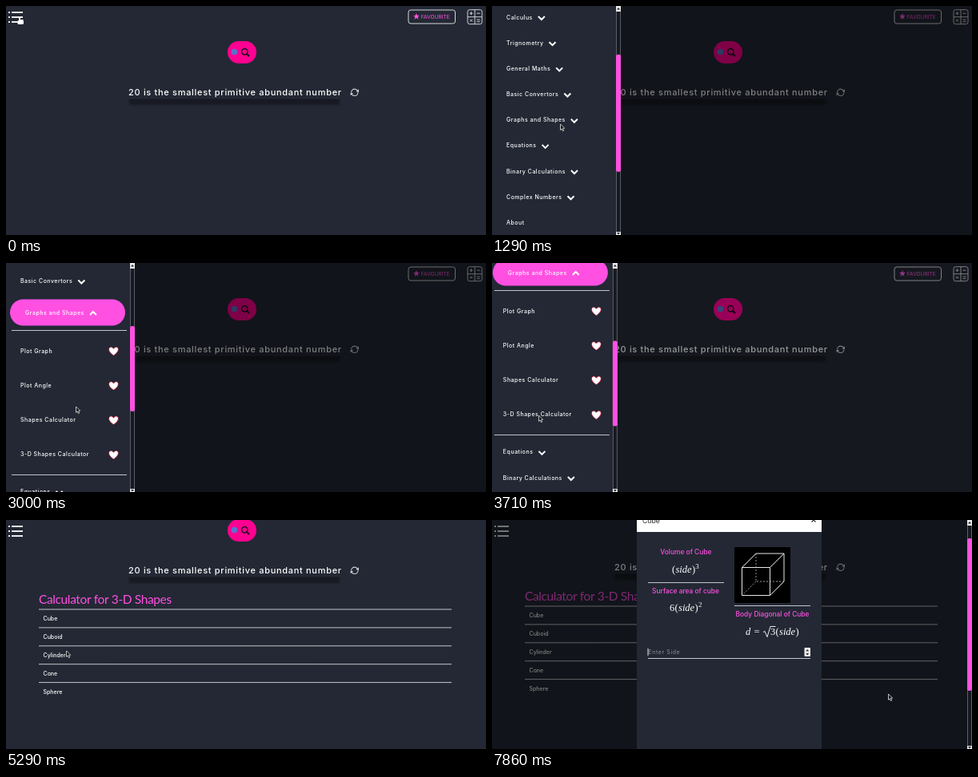
An HTML page with a canvas for the animation above (8 s loop, 600 by 287 pixels).

```html
<!DOCTYPE html>
<html lang="en">
<head>
<meta charset="utf-8">
<title>Calculator for 3-D Shapes</title>
<style>
html, body { margin: 0; width: 100%; height: 100%; overflow: hidden; background: #232834; }
canvas { display: block; width: 600px; height: 287px; }
</style>
</head>
<body>
<canvas id="stage"></canvas>
<script>
const W = 600, H = 287, LOOP = 8000, STEP = 1000 / 7;
const BG = '#232834', PINK = '#ff50e2', HOT = '#ff0090', WHITE = '#fff', RULE = '#c4c6ca';
const SANS = 'Inter, sans-serif', SERIF = '"Liberation Serif", serif';
const SIDE = 161;
const canvas = document.getElementById('stage');
const ctx = canvas.getContext('2d');
const ratio = window.devicePixelRatio || 1;
canvas.width = W * ratio;
canvas.height = H * ratio;

const clamp = x => Math.max(0, Math.min(1, x));
const smooth = x => x * x * (3 - 2 * x);
const inOut = x => x < .5 ? 4 * x ** 3 : 1 - (2 - 2 * x) ** 3 / 2;
const ramp = (t, a, b, ease = smooth) => ease(clamp((t - a) / (b - a)));

// Eased value between [time, value] keys
function track(t, keys) {
  let v = keys[0][1];
  for (let i = 1; i < keys.length; i++) {
    v += (keys[i][1] - keys[i - 1][1]) * ramp(t, keys[i - 1][0], keys[i][0]);
  }
  return v;
}

function text(s, x, y, size, { color = WHITE, weight = 400, gap = 0, font = SANS, align = 'left', style = '' } = {}) {
  ctx.font = `${style} ${weight} ${size}px ${font}`;
  ctx.letterSpacing = gap + 'px';
  ctx.textAlign = align;
  ctx.textBaseline = 'alphabetic';
  ctx.fillStyle = color;
  ctx.fillText(s, x, y);
  return ctx.measureText(s).width;
}

function line(points, color = WHITE, width = 1, dash = []) {
  ctx.beginPath();
  points.forEach(([x, y], i) => i ? ctx.lineTo(x, y) : ctx.moveTo(x, y));
  ctx.strokeStyle = color;
  ctx.lineWidth = width;
  ctx.setLineDash(dash);
  ctx.stroke();
  ctx.setLineDash([]);
}

const rule = (x1, x2, y) => line([[x1, y], [x2, y]], RULE);

function rect(x, y, w, h, color) {
  ctx.fillStyle = color;
  ctx.fillRect(x, y, w, h);
}

function round(x, y, w, h, r, color, stroked) {
  ctx.beginPath();
  ctx.roundRect(x, y, w, h, r);
  if (stroked) {
    ctx.strokeStyle = color;
    ctx.lineWidth = 1;
    ctx.stroke();
  } else {
    ctx.fillStyle = color;
    ctx.fill();
  }
}

function poly(points, color) {
  ctx.beginPath();
  points.forEach(([x, y]) => ctx.lineTo(x, y));
  ctx.closePath();
  ctx.fillStyle = color;
  ctx.fill();
}

function at(x, y, draw) {
  ctx.save();
  ctx.translate(x, y);
  draw();
  ctx.restore();
}

const shade = alpha => rect(0, 0, W, H, `rgba(0,0,0,${alpha})`);

function hamburger() {
  for (const y of [8, 14, 20]) {
    rect(3, y - .9, 2, 1.8, WHITE);
    rect(7, y - .9, 14, 1.8, WHITE);
  }
}

function star(x, y, r) {
  const points = [];
  for (let i = 0; i < 10; i++) {
    const a = i * Math.PI / 5 - Math.PI / 2, d = i % 2 ? r * .42 : r;
    points.push([x + d * Math.cos(a), y + d * Math.sin(a)]);
  }
  poly(points, PINK);
}

function toolbar() {
  round(503, 5, 58.5, 17, 3, '#d6d7da', true);
  star(513, 13.3, 4.2);
  text('FAVOURITE', 518.8, 16.2, 6.6, { color: PINK });
  const c = '#d0d1d4';
  at(577, 4.7, () => {
    round(0, 0, 18, 18, 2.5, c, true);
    line([[9, 0], [9, 18]], c);
    line([[0, 9], [18, 9]], c);
    line([[2.5, 4.5], [6.5, 4.5]], c);
    line([[4.5, 2.5], [4.5, 6.5]], c);
    line([[11.5, 4.5], [15.5, 4.5]], c);
    line([[3, 12], [6, 15]], c);
    line([[6, 12], [3, 15]], c);
    line([[11.5, 12.5], [15.5, 12.5]], c);
    line([[11.5, 15], [15.5, 15]], c);
  });
}

function searchPill() {
  round(277, 44, 36, 28, 14, HOT);
  ctx.beginPath();
  ctx.arc(285.5, 57.5, 3.8, 0, 7);
  ctx.fillStyle = '#5874cc';
  ctx.fill();
  ctx.beginPath();
  ctx.arc(298.3, 57.3, 3.7, 0, 7);
  ctx.strokeStyle = '#16101a';
  ctx.lineWidth = 1.5;
  ctx.stroke();
  line([[301, 60], [304, 63]], '#16101a', 2.1);
}

function refresh(x, y) {
  const c = '#d4d5d9';
  for (const turn of [0, Math.PI]) {
    at(x, y, () => {
      ctx.rotate(turn);
      ctx.beginPath();
      ctx.arc(0, 0, 4.2, Math.PI, Math.PI * 1.85);
      ctx.strokeStyle = c;
      ctx.lineWidth = 1.1;
      ctx.stroke();
      poly([[5.2, -4], [5.2, -.3], [1.8, -1]], c);
    });
  }
}

function fact() {
  ctx.save();
  ctx.beginPath();
  ctx.rect(140, 116.5, 290, 20);
  ctx.clip();
  ctx.filter = 'blur(1.8px)';
  rect(154, 108, 263, 16, '#171a22');
  ctx.restore();
  text('20 is the smallest primitive abundant number', 153, 112, 11, { weight: 500, gap: .69 });
  refresh(435.8, 108.3);
}

const SHAPES = ['Cube', 'Cuboid', 'Cylinder', 'Cone', 'Sphere'];

function shapeList(t) {
  if (t < 3800) return;
  text('Calculator for 3-D Shapes', 41, 150.2, 15.5, { color: PINK, gap: -.38, font: 'Lato, sans-serif' });
  ctx.save();
  ctx.beginPath();
  ctx.rect(0, 150, W, track(t, [[4000, 8], [4140, 29], [4430, 130]]));
  ctx.clip();
  SHAPES.forEach((name, i) => {
    const y = 157 + i * 22.9;
    rule(41, 557, y);
    text(name, 46.5, y + 14, 7, { weight: 500 });
  });
  ctx.restore();
}

function page(t) {
  rect(0, 0, W, H, BG);
  const scroll = track(t, [[4710, 0], [5290, 45], [5710, 49]]);
  at(0, -scroll, () => {
    toolbar();
    searchPill();
    fact();
    shapeList(t);
  });
  hamburger();
}

function scrollbar(x, top, size) {
  rect(x, 0, 6, H, '#5b5e66');
  rect(x + 1, 0, 4, H, '#16191f');
  rect(x, 0, 6, 7, '#e8e8ea');
  rect(x, 283, 6, 4, '#e8e8ea');
  poly([[x + 1, 4.5], [x + 3, 2], [x + 5, 4.5]], '#222');
  poly([[x + 1, 284], [x + 5, 284], [x + 3, 286.5]], '#222');
  round(x, top, 6, size, 2.5, PINK);
}

function chevron(x, y, up) {
  const d = up ? -2 : 2;
  line([[x - 4, y - d], [x, y + d], [x + 4, y - d]], WHITE, 2);
}

function heart(x, y) {
  ctx.beginPath();
  ctx.moveTo(x, y + 5);
  ctx.bezierCurveTo(x - 10, y - 2, x - 4, y - 8, x, y - 2.6);
  ctx.bezierCurveTo(x + 4, y - 8, x + 10, y - 2, x, y + 5);
  ctx.fillStyle = WHITE;
  ctx.strokeStyle = '#e0304c';
  ctx.lineWidth = 1.2;
  ctx.stroke();
  ctx.fill();
}

const MENU = ['Home', 'Algebra', 'Calculus', 'Trignometry', 'General Maths', 'Basic Convertors',
  'Graphs and Shapes', 'Equations', 'Binary Calculations', 'Complex Numbers', 'About'];
const GRAPHS = ['Plot Graph', 'Plot Angle', 'Shapes Calculator', '3-D Shapes Calculator'];
const LABEL = { weight: 500, gap: .5 };

function menuRow(name, x, y, open) {
  const w = text(name, x, y + 2.5, 7, LABEL);
  if (name !== 'Home' && name !== 'About') chevron(x + w + 11, y + 1, open);
}

function submenu(y, open) {
  ctx.save();
  ctx.beginPath();
  ctx.rect(0, y + 17, 155, 12 + 181 * open);
  ctx.clip();
  for (const d of [22.5, 203.5]) rule(7, 151, y + d);
  GRAPHS.forEach((name, i) => {
    const row = y + 48 + i * 43.3;
    text(name, 18, row + 2.5, 7, LABEL);
    heart(134.5, row + .5);
  });
  ctx.restore();
}

function sidebar(t) {
  const shown = ramp(t, 140, 640, inOut) - ramp(t, 3600, 4215, inOut);
  if (shown <= 0) return;
  const dim = ramp(t, 140, 560) - ramp(t, 3600, 4000);
  shade(.5 * dim);
  const open = ramp(t, 1430, 1860);
  const scroll = track(t, [[570, 0], [1200, 105], [2000, 105], [2950, 193], [3050, 193], [3430, 243]]);
  const full = 535 + 200 * open;
  at((shown - 1) * SIDE, 0, () => {
    rect(0, 0, SIDE, H, BG);
    at(0, -scroll, () => MENU.forEach((name, i) => {
      const y = 54.7 + i * 32.17;
      if (i === 6 && open > 0) {
        const py = y + 7.3 * open;
        round(5, py - 16.5, 144, 33, 16.5, PINK);
        menuRow(name, 24, py, true);
        submenu(py, open);
      } else {
        menuRow(name, 18, y + (i > 6 ? 200 * open : 0), false);
      }
    }));
    scrollbar(155, 7 + scroll / full * 274, 274 * H / full);
  });
}

// Upright or italic serif runs set one after another
function formula(x, y, runs) {
  for (const [s, kind] of runs) {
    const sup = kind === 'sup';
    x += text(s, x, y - (sup ? 5 : 0), sup ? 9 : 12.5,
      { font: SERIF, style: kind === 'it' ? 'italic' : '' }) + (sup ? 0 : .3);
  }
}

const sideRuns = [['('], ['side', 'it'], [')']];

function cubePicture() {
  rect(303, 34, 70, 70, '#000');
  const c = '#e8e8e8', hidden = '#bbb';
  line([[312.5, 59.5], [347.5, 59.5], [347.5, 94.5], [312.5, 94.5], [312.5, 59.5]], c);
  line([[312.5, 59.5], [330, 42], [365, 42], [365, 77], [347.5, 94.5]], c);
  line([[347.5, 59.5], [365, 42]], c);
  line([[330, 42], [330, 77], [365, 77]], hidden, .8, [2, 2]);
  line([[330, 77], [312.5, 94.5]], hidden, .8, [2, 2]);
}

function modal(t) {
  const heading = { color: PINK, align: 'center', weight: 500 };
  const ink = '#2b2b2b';
  rect(181, -13, 231, 385, BG);
  rect(181, -13, 231, 28, WHITE);
  text('Cube', 188, 4, 8.7, { color: ink });
  line([[399.5, -2.5], [404.5, 2.5]], ink, 1.1);
  line([[404.5, -2.5], [399.5, 2.5]], ink, 1.1);

  text('Volume of Cube', 242.3, 43, 8.4, heading);
  formula(225, 66, [...sideRuns, ['3', 'sup']]);
  rule(195, 290, 78.5);
  text('Surface area of cube', 242, 91.7, 8.4, heading);
  formula(222, 114.3, [['6'], ...sideRuns, ['2', 'sup']]);

  cubePicture();
  rule(303, 398, 107.5);
  text('Body Diagonal of Cube', 350.5, 120.7, 8.4, heading);
  formula(317, 144, [['d', 'it']]);
  formula(327.5, 144, [['=']]);
  line([[339, 140.5], [341, 139.5], [344, 146.5], [348, 133.5], [354.5, 133.5]], WHITE, .9);
  formula(348, 144, [['3'], ...sideRuns]);

  text('Enter Side', 195.5, 168, 7, { color: '#8b8e95', gap: .6 });
  rule(195, 398, 173.5);
  if (t > 7130) {
    rect(194.5, 161, 1, 9, '#e8e8ea');
    round(390.5, 160, 7.5, 11, 1, '#efefef');
    poly([[392.2, 164.5], [394.2, 162], [396.2, 164.5]], '#333');
    poly([[392.2, 167], [396.2, 167], [394.2, 169.5]], '#333');
  }
}

function dialog(t) {
  shade(.5 * ramp(t, 6000, 6400));
  if (t < 6300) return;
  const scroll = track(t, [[6650, 0], [6980, 25]]);
  const enter = ramp(t, 6290, 6640);
  ctx.globalAlpha = enter;
  at(0, 25 - scroll - 40 * (1 - enter), () => modal(t));
  ctx.globalAlpha = 1;
  scrollbar(594, 6 + scroll * .68, 191);
}

function hand(x, y) {
  round(x, y, 2, 6, 1, WHITE);
  round(x - 1.5, y + 4, 7.5, 5, 1.5, WHITE);
  rect(x + 2.3, y + 3, 3.2, 3, WHITE);
}

function arrow(x, y) {
  const shape = [[0, 0], [0, 7.4], [1.7, 5.9], [2.9, 8.7], [4.2, 8.1], [3.1, 5.4], [5.2, 5.2]]
    .map(([dx, dy]) => [x + dx - .5, y + dy]);
  poly(shape, '#15171c');
  line([...shape, shape[0]], '#e4e4e4', .8);
}

const PATH = [[0, 16, 14], [430, 16, 14], [1250, 86, 148], [1860, 86, 148], [2300, 88, 180], [3000, 88, 180],
  [3430, 59, 191], [4710, 59, 191], [5280, 76, 164], [5710, 112, 124], [6000, 112, 124], [6280, 120, 131],
  [7000, 250, 163], [7250, 250, 163], [7850, 496, 218]];

function cursor(t) {
  const x = track(t, PATH.map(([k, px]) => [k, px]));
  const y = track(t, PATH.map(([k, , py]) => [k, py]));
  if (t < 500) hand(x, y);
  else arrow(x, y);
}

const start = performance.now();

function frame() {
  // The screen refreshes seven times a second
  const clock = (performance.now() - start) % LOOP;
  const t = Math.floor((clock + 5) / STEP) * STEP % LOOP;
  ctx.setTransform(ratio, 0, 0, ratio, 0, 0);
  page(t);
  sidebar(t);
  dialog(t);
  cursor(t);
  requestAnimationFrame(frame);
}

frame();
</script>
</body>
</html>
```
